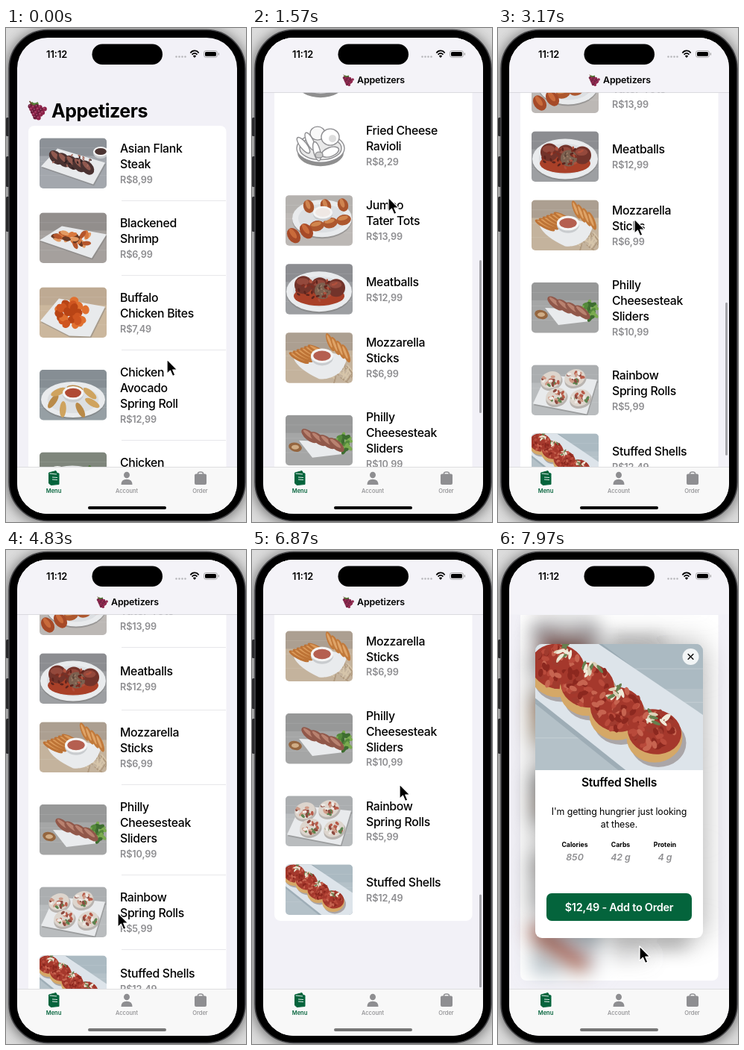
Animation of 322x662 px, one loop 8000 ms. Source, as an HTML page:

```html
<!DOCTYPE html>
<html lang="en">
<head>
<meta charset="utf-8">
<title>Appetizers</title>
<style>
html, body { margin: 0; width: 100%; height: 100%; overflow: hidden; background: #ccc; }
svg { display: block; }
#stage { width: 100vw; height: 100vh; }
text { font-family: Inter, Roboto, "Open Sans", sans-serif; white-space: pre; }
</style>
</head>
<body>
<svg id="stage" viewBox="0 0 322 662"></svg>
<script>
const LOOP = 8000, GREEN = '#04643c', GRAY = '#8e8e91', PAPER = '#f2f1f7';

// ---- drawing helpers ----
const ell = (x, y, rx, ry, fill, rot = 0, more = '') =>
  `<ellipse cx="${x}" cy="${y}" rx="${rx}" ry="${ry}" fill="${fill}" transform="rotate(${rot} ${x} ${y})" ${more}/>`;
const box = (x, y, w, h, fill, r = 0, more = '') =>
  `<rect x="${x}" y="${y}" width="${w}" height="${h}" rx="${r}" fill="${fill}" ${more}/>`;
const path = (d, fill, more = '') => `<path d="${d}" fill="${fill}" ${more}/>`;
const label = (x, y, size, weight, str, fill = '#000', more = '') =>
  `<text x="${x}" y="${y + size * 0.36}" font-size="${size}" font-weight="${weight}" fill="${fill}" ${more}>${str}</text>`;
const tight = em => ` letter-spacing="${em}em"`;
const mid = 'text-anchor="middle"';

function random(seed) {
  return () => {
    seed = (seed * 16807) % 2147483647;
    return seed / 2147483647;
  };
}

// A heap of small ellipses scattered inside an oval.
function heap(seed, n, cx, cy, w, h, rx, ry, colors) {
  const rnd = random(seed * 7919);
  rnd();
  let out = '';
  for (let i = 0; i < n; i++) {
    const a = rnd() * 6.283, d = Math.sqrt(rnd());
    out += ell((cx + Math.cos(a) * d * w).toFixed(1), (cy + Math.sin(a) * d * h).toFixed(1),
      rx, ry, colors[i % colors.length], Math.round(rnd() * 180));
  }
  return out;
}

// A row of pieces placed along a line.
function line(n, x, y, dx, dy, rx, ry, rot, fill, shine) {
  let out = '';
  for (let i = 0; i < n; i++) {
    const px = x + dx * i, py = y + dy * i;
    out += ell(px, py, rx, ry, fill, rot) + ell(px - 1, py - ry * 0.35, rx * 0.7, ry * 0.4, shine, rot);
  }
  return out;
}

const table = (top, low) => box(0, 0, 90, 68, low) + box(0, 0, 90, 24, top, 0, 'opacity=".7"') +
  [13, 31, 50].map(y => box(0, y, 90, 0.6, '#fff', 0, 'opacity=".15"')).join('');
const plate = d => path(d, '#777', 'opacity=".45" transform="translate(1 2)"') + path(d, '#e8eaec');
const dish = (x, y, rx, ry) => ell(x, y + 2, rx, ry, '#777', 0, 'opacity=".5"') + ell(x, y, rx, ry, '#e9ebed') +
  ell(x, y, rx * 0.8, ry * 0.76, '#dcdfe2');
const dip = (x, y, r, sauce) => ell(x, y + 2, r, r * 0.75, '#c9cccf') + ell(x, y, r, r * 0.65, '#f5f5f5') +
  ell(x, y, r * 0.78, r * 0.45, sauce);

// ---- thumbnails, each 90 by 68 ----
const steak = () => table('#83888f', '#a3a7ad') + dip(82, 18, 10, '#4b3432') +
  plate('M2 38L24 14L88 33L72 62Z') +
  line(5, 22, 26, 10.5, 3.4, 11, 7.5, 48, '#4a3231', '#91594f') + heap(3, 18, 44, 32, 27, 9, 2, 1, ['#2f2022', '#a76c60']);
const shrimp = () => table('#8b8685', '#a5a09d') + plate('M0 37L30 18L90 29L70 61Z') +
  heap(5, 24, 45, 35, 27, 9, 6, 3, ['#d8783e', '#e39a62', '#b5552b', '#6b3a25']);
const buffalo = () => table('#b9a68f', '#cbb79d') + plate('M1 45L26 15L88 26L68 66L40 65Z') +
  heap(8, 26, 44, 34, 19, 17, 6, 5, ['#cf5520', '#e0702f', '#b84415']);
const rolls = () => {
  let out = table('#7f888d', '#969fa4') + dish(45, 40, 43, 24);
  for (let i = 0; i < 7; i++) {
    const a = i * 0.9 + 0.3;
    out += ell(45 + 27 * Math.cos(a), 40 + 15 * Math.sin(a), 11, 4.3, i % 2 ? '#b98a48' : '#cfa35e', 20 + a * 35);
  }
  return out + dip(45, 31, 14, '#b04a34');
};
const dumplings = () => table('#6f786b', '#a4a7a4') + dish(44, 40, 42, 22) + dip(24, 25, 10, '#4a2d22') +
  heap(4, 10, 70, 25, 14, 6, 4, 2, ['#4e7b39', '#6d994e']) +
  line(3, 39, 29, 15, 5, 11, 7, 18, '#cf9148', '#e7bd7a') + line(3, 25, 43, 17, 4, 11, 7, 14, '#d6994e', '#efc98b');
const tots = () => table('#b3b0ad', '#bcb8b5') + dish(49, 31, 40, 25) +
  line(3, 31, 15, 23, -1, 9, 7, 70, '#a9552d', '#cf8450') + line(3, 42, 41, 18, -4, 10, 7, -14, '#ad572e', '#d0854d') +
  dip(50, 23, 13, '#efe8e4') + line(2, 28, 48, -17, 6, 11, 8, 55, '#a64a28', '#c96b3b');
const meatballs = () => table('#85868a', '#9d9fa2') + dish(45, 37, 44, 27) + ell(45, 43, 34, 13, '#a94028') +
  line(3, 24, 28, 22, 2, 12, 12, 0, '#72332a', '#94493c') + ell(50, 36, 11, 11, '#7c6150') +
  heap(2, 14, 50, 36, 8, 8, 1.6, 1, ['#9a7a64', '#5e4539']) +
  heap(9, 30, 43, 34, 31, 15, 2.6, 1.4, ['#b0503c', '#7d2c20', '#5d241d']);
const sticks = () => table('#a3978c', '#c4b39d') + heap(6, 26, 73, 55, 20, 11, 7, 1, ['#d6c5aa', '#b09a7f']) +
  path('M11 35Q17 49 45 62Q58 64 72 54Q80 46 83 32L40 22Z', '#e9ebed') +
  line(6, 18, 34, 5, -2, 15, 4, 28, '#bd7336', '#db9a5a') + line(4, 60, 13, 7, 5, 13, 4, 68, '#c27a3b', '#dfa468') +
  dip(49, 31, 15, '#b55f50');
const sliders = () => table('#929393', '#a5a6a6') + ell(13, 43, 9, 6, '#95663f', 15) + ell(13, 43, 5, 3, '#d0ad85') +
  path('M18 34L70 36L78 52L36 57Z', '#e9ebed') +
  heap(7, 26, 78, 38, 11, 11, 5, 2.5, ['#54893b', '#7bab50', '#3e6d30']) +
  line(4, 32, 28, 12, 4, 13, 6, 40, '#91584a', '#b98270');
const rainbow = () => table('#a6a9ac', '#b9bcbe') + plate('M2 52L20 13L88 20L74 66Z') +
  [[26, 20], [58, 17], [33, 42], [65, 44]].map(([x, y], i) => ell(x + 1, y + 3, 15, 11, '#b9b4b0', -20) +
    ell(x, y, 14, 11, '#ddd5cd', -20) +
    heap(11 + i, 20, x, y, 11, 8, 3, 1.8, ['#b75a48', '#d09a86', '#5d8450', '#efeae5', '#8d4a3f'])).join('');
const shells = () => {
  const spots = [[12, 13], [28, 23], [44, 36], [64, 48]];
  return table('#a9b8c0', '#b4c1c8') + path('M36 0L90 41V68H45L0 32V0Z', '#8fa1ab', 'opacity=".6"') +
    path('M34 0L90 38V68H49L0 29V0Z', '#dde4ea') +
    spots.map(([x, y], i) => ell(x + 2, y + 5, 15, 13, '#aaa6a8') + ell(x, y + 2, 15, 13.5, '#d5a867') +
      ell(x, y - 1, 14.5, 12, '#a5382c', 12) +
      heap(21 + i, 46, x, y - 1, 13, 11, 2.2, 1.3, ['#b94a3b', '#8c281f', '#c76450', '#a03a2e']) +
      heap(31 + i, 10, x + 2, y - 9, 6, 4, 2.6, 0.9, ['#f0ead9', '#ddd2b8', '#66804f'])).join('');
};
const bowl = () => {
  const edge = `stroke="${GRAY}" stroke-width="1.4"`;
  let out = ell(47, 43, 31, 18, '#8f8f8f') + ell(47, 37, 32, 19, '#fff', 0, edge) + ell(47, 37, 28, 15.5, '#e9e9e9', 0, edge);
  out += ell(43, 17, 10, 9, '#f8f8f8', 0, edge) + ell(60, 22, 12, 11, '#fff', 0, edge) + ell(63, 24, 5, 5, '#ddd');
  for (let i = 0; i < 3; i++) out += ell(24 + i * 9, 33 + i * 4 - (i % 2) * 9, 4.5, 13, '#fff', -38 + i * 12, edge);
  return out + ell(60, 42, 12, 6, '#fff', -20, edge) + ell(45, 46, 5, 4, '#ccc', 0, edge);
};

const menu = [
  ['Asian Flank|Steak', '8,99', steak], ['Blackened|Shrimp', '6,99', shrimp],
  ['Buffalo|Chicken Bites', '7,49', buffalo], ['Chicken|Avocado|Spring Roll', '12,99', rolls],
  ['Chicken|Dumplings', '8,99', dumplings], ['Chicken|Fingers', '9,99', bowl],
  ['Chicken Wings', '11,49', bowl], ['Fried Cheese|Ravioli', '8,29', bowl],
  ['Jumbo|Tater Tots', '13,99', tots], ['Meatballs', '12,99', meatballs],
  ['Mozzarella|Sticks', '6,99', sticks], ['Philly|Cheesesteak|Sliders', '10,99', sliders],
  ['Rainbow|Spring Rolls', '5,99', rainbow], ['Stuffed Shells', '12,49', shells]
];

function grapes() {
  let out = path('M5 8Q3 3 8 2Q10 5 15 2Q18 6 14 9Z', '#55803a') + path('M8 6L4 1', 'none', 'stroke="#6b4a2c" stroke-width="1.6"');
  for (let r = 0; r < 5; r++) {
    for (let i = 0; i < 5 - Math.abs(r - 1); i++) {
      const x = 5 + i * 4.4 + r * 1.7, y = 8 + r * 3.6 + (i % 2) * 1.2;
      out += ell(x, y, 3, 3, (i + r) % 2 ? '#8c2249' : '#6b1b3b') + ell(x - 0.8, y - 0.9, 0.9, 0.8, '#b86282');
    }
  }
  return out;
}

function rows() {
  let top = 131, out = '', rules = '';
  menu.forEach(([name, price, pic], i) => {
    const words = name.split('|'), n = words.length, h = [84, 100, 121][n - 1];
    const first = top + h / 2 + 1 - 10.5 * n;
    const late = i > 7;
    out += `<g transform="translate(45 ${top + h / 2 - 33.5})">
      <g clip-path="url(#thumb)" ${late ? 'class="late"' : ''}>${pic()}</g>
      ${late ? `<g class="wait">${bowl()}</g>` : ''}</g>`;
    words.forEach((w, k) => { out += label(153, first + 21 * k, 15.8, 500, w, '#000', tight(-0.02)); });
    out += label(153, first + 21 * n, 12.7, 600, 'R$' + price, GRAY, tight(-0.01));
    top += h;
    if (i < menu.length - 1) rules += box(155, top, 140, 0.8, '#e2e2e5');
  });
  return { out: `<g id="rules">${rules}</g>${out}`, end: top };
}

const list = rows();

const phone = box(0, 0, 322, 662, '#dcdcdc') +
  box(3, 4, 318, 658, '#000', 52, 'opacity=".6" filter="url(#cast)"') +
  [[120, 25], [172, 41], [226, 47]].map(([y, h]) => box(0, y, 6, h, '#2a2a2c', 1.5)).join('') +
  box(4, 2.5, 317, 658, '#000', 52, 'stroke="#434346" stroke-width="1.6"');

const navBar = box(15, 13, 295, 73.5, '#f4f3f8') +
  `<g id="navTitle">${box(15, 86, 295, 0.7, '#cfcfd4')}
   <g transform="translate(120.5 62) scale(.6)">${grapes()}</g>
   ${label(141, 70, 12.4, 600, 'Appetizers', '#000', tight(-0.01))}</g>`;

const tabBar = box(15, 588, 295, 63, '#f8f8f8') + box(15, 588, 295, 0.7, '#d3d3d6') +
  path('M57.5 596L67 593.5L68.5 596.5L71 597V611.5L60 612.5L57.5 610Z', GREEN, `stroke="${GREEN}" stroke-width="1" stroke-linejoin="round"`) +
  path('M58.5 597L68 598M62 602L69 602.5M62 605L69 605.5', 'none', 'stroke="#f8f8f8" stroke-width=".9"') +
  ell(162, 599, 4, 4.3, GRAY) + path('M154.5 612Q154.5 604.8 162 604.8Q169.5 604.8 169.5 612Z', GRAY) +
  box(253, 597.5, 16, 14.5, GRAY, 2) + path('M257.5 600V597Q257.5 595 261 595Q264.5 595 264.5 597V600', 'none', `stroke="${GRAY}" stroke-width="1.5"`) +
  label(64, 620, 7.5, 600, 'Menu', GREEN, mid) + label(162, 620, 7.5, 500, 'Account', GRAY, mid) +
  label(260.5, 620, 7.5, 500, 'Order', GRAY, mid);

const wifi = [7, 4.2].map(r => path(`M${253 - r * 0.8} ${39 - r * 0.8}A${r} ${r * 1.1} 0 0 1 ${253 + r * 0.8} ${39 - r * 0.8}`,
  'none', 'stroke="#000" stroke-width="1.8"')).join('') + path('M253 40L250.8 37.4Q253 35.8 255.2 37.4Z', '#000');
const statusBar = label(54, 35, 12.8, 600, '11:12') + box(115.5, 21.5, 94.5, 27.5, '#000', 13.7) +
  [0, 1, 2, 3].map(i => ell(228.5 + i * 4, 38.5, 1.2, 1.2, '#b5b5b9')).join('') + wifi +
  box(265.5, 30.5, 18, 8.8, 'none', 2.8, 'stroke="#999" stroke-width=".8"') + box(267, 32, 15, 5.8, '#000', 1.6) +
  box(284.8, 33.3, 1.1, 3.2, '#999', 0.5);

const facts = [[103, 'Calories', '850'], [164.5, 'Carbs', '42 g'], [224, 'Protein', '4 g']];
const card = box(50, 126, 225, 394, '#000', 9, 'opacity=".34" filter="url(#shade)"') +
  `<g clip-path="url(#cardClip)">${box(50, 126, 225, 394, '#fff')}
   <svg x="50" y="126" width="225" height="169" viewBox="0 0 90 67.6">${shells()}</svg></g>` +
  ell(258.5, 143, 11, 11, '#fff', 0, 'opacity=".85"') +
  path('M254.7 139.2l7.6 7.6m0-7.6l-7.6 7.6', 'none', 'stroke="#000" stroke-width="1.3"') +
  label(162.5, 311, 15.7, 600, 'Stuffed Shells', '#000', mid + tight(-0.02)) +
  ["I'm getting hungrier just looking", 'at these.'].map((s, i) =>
    label(162.5, 351 + 17 * i, 12.4, 400, s, '#000', mid + tight(-0.01))).join('') +
  facts.map(([x, k, v]) => label(x, 395, 8.7, 700, k, '#000', mid) +
    label(x, 412, 12.3, 600, v, GRAY, mid + ' font-style="italic"')).join('') +
  box(65, 460, 195, 37, GREEN, 7) +
  label(162.5, 478.5, 14.5, 600, '$12,49 - Add to Order', '#fff', mid + tight(-0.02));

const blur = (id, size, height) => `<filter id="${id}" filterUnits="userSpaceOnUse" x="-60" y="-60" width="442" height="${height}">
  <feGaussianBlur stdDeviation="${size}"/></filter>`;
const $ = id => document.getElementById(id);
$('stage').innerHTML = `<defs>
  <clipPath id="screen">${box(15, 13, 295, 638, '#000', 41)}</clipPath>
  <clipPath id="thumb">${box(0, 0, 90, 67.5, '#000', 5)}</clipPath>
  <clipPath id="cardClip">${box(50, 126, 225, 394, '#000', 9)}</clipPath>
  <clipPath id="below">${box(15, 87, 295, 502, '#000')}</clipPath>
  ${blur('soft', 12, 1760)}${blur('shade', 19, 780)}${blur('cast', 9, 780)}
</defs>${phone}
<g clip-path="url(#screen)">${box(15, 13, 295, 638, PAPER)}
  <g id="view"><g id="scroll">
    <g transform="translate(27.5 97)">${grapes()}</g>
    ${label(61, 110.5, 25, 700, 'Appetizers', '#000', tight(-0.02))}
    ${box(30, 131, 265.5, list.end - 131, '#fff', 8)}
    <g id="rows">${list.out}</g>
  </g></g>
  <g id="nav">${navBar}</g>
  ${box(305, 0, 3, 205, '#a3a3a8', 1.5, 'id="bar"')}
  <g id="card">${card}</g>
  ${tabBar}${statusBar}
  ${box(110, 641, 105, 4, '#000', 2, 'id="home"')}
</g>
${path('M0 0V19.4L4.4 15.3L7.6 22.6L10.9 21.2L7.8 14.1H13.8Z', '#000', 'id="cursor" stroke="#fff" stroke-width="1.3" stroke-linejoin="round"')}`;

// ---- motion ----
const clamp = v => Math.min(1, Math.max(0, v));
const ramp = (t, a, b) => clamp((t - a) / (b - a));
const ease = u => u * u * (3 - 2 * u);

// time, x, y of the pointer
const trail = [
  [0, 216, 444], [830, 196, 444], [872, 194, 444], [1001, 183, 227], [2500, 183, 227], [3150, 183, 256],
  [3330, 183, 256], [4200, 150, 486], [4870, 150, 486], [6300, 196, 524], [6370, 196, 524], [6860, 198, 314],
  [7170, 198, 314], [7730, 190, 531], [LOOP, 190, 531]
];
const FLICK = 1001, GRAB = 6370, RELEASE = 6885, BOTTOM = 948;

function pointer(t) {
  const i = trail.findIndex(k => k[0] > t), [t0, x0, y0] = trail[i - 1], [t1, x1, y1] = trail[i];
  let u = ramp(t, t0, t1);
  if (t1 !== FLICK) u = ease(u);
  return [x0 + (x1 - x0) * u, y0 + (y1 - y0) * u];
}

function offset(t, y) {
  if (t < FLICK) return t < 872 ? 0 : 444 - y;
  if (t < GRAB) return Math.min(906, 911 - 694 * Math.exp((FLICK - t) / 427));
  if (t < RELEASE) {
    const s = 906 + 524 - y, pull = 0.55 * (s - BOTTOM);
    return pull > 0 ? BOTTOM + pull * 600 / (600 + pull) : s;
  }
  const u = (t - RELEASE) / 50;
  return BOTTOM + 80 * (1 + u) * Math.exp(-u);
}

const scrolling = t => t < GRAB
  ? ramp(t, 872, 920) * (1 - ramp(t, 3400, 3700))
  : ramp(t, GRAB, 6420) * (1 - ramp(t, 7350, 7700));

const set = (id, key, value) => $(id).setAttribute(key, value);
const show = (el, on) => { el.style.display = on ? '' : 'none'; };
const late = document.querySelectorAll('.late'), wait = document.querySelectorAll('.wait');

function draw(t) {
  const [x, y] = pointer(t), s = offset(t, y), over = Math.max(0, s - BOTTOM), open = t >= 7870;
  set('cursor', 'transform', `translate(${x} ${y})`);
  set('scroll', 'transform', `translate(0 ${-s})`);
  set('nav', 'opacity', ramp(s, 28, 42));
  set('bar', 'y', 77.4 + 0.3206 * (s - over) + over);
  set('bar', 'height', 205 - over);
  set('bar', 'opacity', scrolling(t));
  set('rules', 'opacity', 1 - scrolling(t));
  const shade = Math.round(118 * ramp(t, 4000, 4400));
  set('home', 'fill', `rgb(${shade},${shade},${shade})`);
  late.forEach(el => show(el, t >= 1500));
  wait.forEach(el => show(el, t < 1500));
  show($('card'), open);
  show($('navTitle'), !open);
  if (open) { set('rows', 'filter', 'url(#soft)'); set('view', 'clip-path', 'url(#below)'); }
  else { $('rows').removeAttribute('filter'); $('view').removeAttribute('clip-path'); }
}

const start = performance.now();
function tick() {
  draw((performance.now() - start) % LOOP);
  requestAnimationFrame(tick);
}
draw(0);
tick();
</script>
</body>
</html>
```
